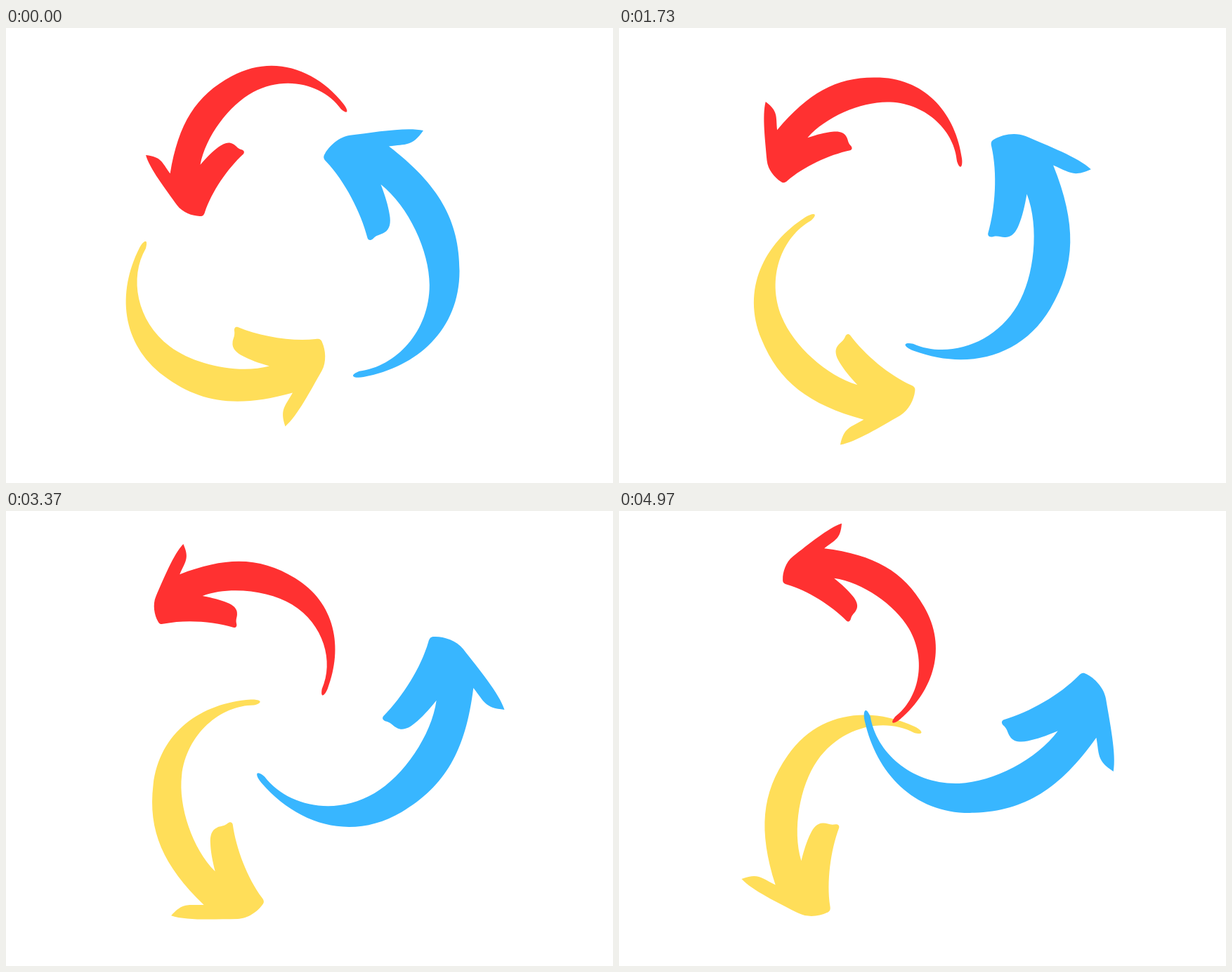
These frames come from a looping animation (864 px wide and 648 px high, 5.01 s). An HTML page with a canvas:

```html
<!DOCTYPE html>
<html lang="en">
<head>
<meta charset="utf-8">
<title>Turning arrows</title>
<style>
  html, body { margin: 0; width: 100%; height: 100%; overflow: hidden; background: #fff; }
  canvas { display: block; }
</style>
</head>
<body>
<canvas id="stage" width="864" height="648"></canvas>
<script>
const ctx = document.getElementById('stage').getContext('2d');
const LOOP = 5010, STEP = 100 / 3, LAST = 149;
const TURN = 87.85 / LAST; // degrees per step

const PIVOT = { x: 532.1, y: 315.4 };
const shaft = 'M545 168.5 C616 223 645.5 274 645.5 346 C645.5 430 585 483 509 497'
  + 'C496 499.5 486 495.5 503 488.7'
  + 'C555 482.5 602.8 432 602.8 366 C602.8 318 573 254 533.5 222.8';
const innerBarb = 'C540 240 544 253 546 266 C548 277 546.5 287 538.5 291.3'
  + 'C534 294.5 529 294 523.5 299 C519 304 515.5 302 514.5 299';
const head = 'C505 262 482 218 456 190.5 C452 186.5 451 183.5 454 179'
  + 'C460 168 474 155 490 152.8';
const outerBarb = 'C524 148.5 570 140.5 594 146 C578 169 570 165 545 168.5Z';
const arrow = new Path2D(shaft + innerBarb + head + outerBarb);

const ARROWS = [
  { color: '#ffde59', x: 308.6, y: 429.9, size: 0.908, angle: 127.05 },
  { color: '#ff3131', x: 342.8, y: 160.7, size: 0.805, angle: -118.15 },
  { color: '#38b6ff', x: PIVOT.x, y: PIVOT.y, size: 1, angle: 0 }
];

function drawArrow({ color, x, y, size, angle }, turned) {
  ctx.save();
  ctx.translate(x, y);
  ctx.rotate((angle + turned) * Math.PI / 180);
  ctx.scale(size, size);
  ctx.translate(-PIVOT.x, -PIVOT.y);
  ctx.fillStyle = color;
  ctx.fill(arrow);
  ctx.restore();
}

function draw(now) {
  const step = Math.min(LAST, Math.floor((now % LOOP + 5) / STEP));
  ctx.fillStyle = '#fff';
  ctx.fillRect(0, 0, 864, 648);
  for (const a of ARROWS) drawArrow(a, step * TURN);
  requestAnimationFrame(draw);
}

draw(performance.now());
</script>
</body>
</html>
```
